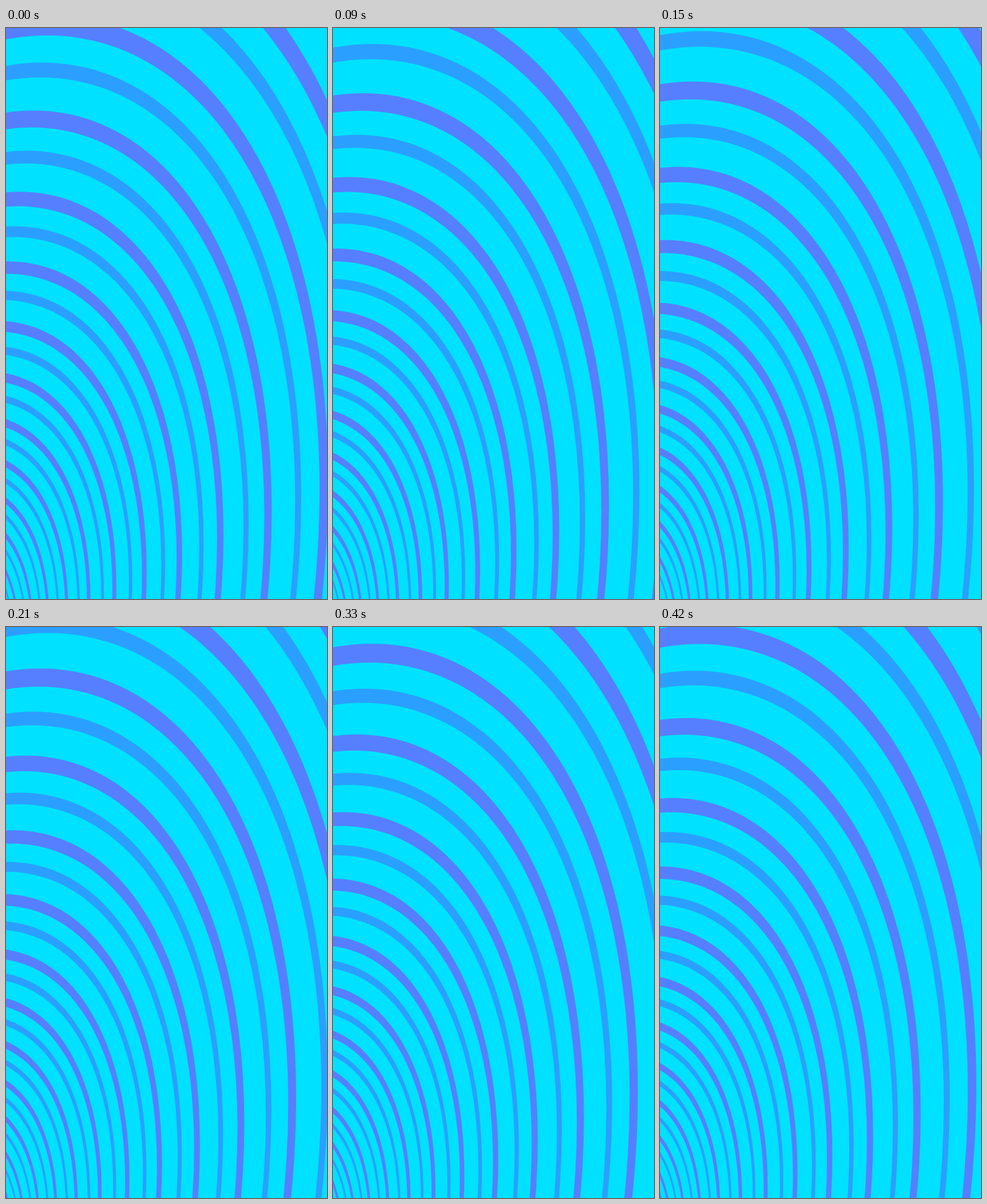
Recreate the animation shown at these times as an HTML page with a canvas. Size 561 px wide and 998 px high, loop 450 ms.

```html
<!DOCTYPE html>
<html lang="en">
<head>
<meta charset="utf-8">
<title>Tilted rings</title>
<style>
html, body { margin: 0; width: 100%; height: 100%; overflow: hidden; background: #00e1ff; }
canvas { display: block; }
</style>
</head>
<body>
<canvas id="stage" width="561" height="998"></canvas>
<script>
const ctx = document.getElementById('stage').getContext('2d');
const CYAN = '#00e1ff', PURPLE = '#557fff', BLUE = '#2a9fff';
const CENTER = { x: -122, y: 1130 };
const HALF_WIDTH = 670, HALF_HEIGHT = 1117, TILT = 0.29;
const RATIO = 0.856;            // size of each ring relative to the next one out
const STEP_MS = 30, STEPS = 15, PHASE_STEP = 0.0645;

// Fills a tilted ellipse around the shared center.
function disc(scaleX, scaleY, color) {
  const w = HALF_WIDTH * scaleX, h = HALF_HEIGHT * scaleY;
  ctx.setTransform(w, -h * TILT, 0, h * Math.sqrt(1 - TILT * TILT), CENTER.x, CENTER.y);
  ctx.beginPath();
  ctx.arc(0, 0, 1, 0, 2 * Math.PI);
  ctx.fillStyle = color;
  ctx.fill();
}

function band(scaleX, scaleY, growX, growY, color) {
  disc(scaleX * growX, scaleY * growY, color);
  disc(scaleX, scaleY, CYAN);
}

function draw(time) {
  const phase = Math.floor(time / STEP_MS) % STEPS * PHASE_STEP;
  ctx.setTransform(1, 0, 0, 1, 0, 0);
  ctx.fillStyle = CYAN;
  ctx.fillRect(0, 0, 561, 998);
  for (let ring = -3; ring < 15; ring++) {
    const size = RATIO ** (ring - phase);
    band(size, size, 1.0225, 1.031, PURPLE);
    band(size * 0.9365, size * 0.9343, 1.0167, 1.0247, BLUE);
  }
}

function tick() {
  draw(performance.now());
  requestAnimationFrame(tick);
}
tick();
</script>
</body>
</html>
```
